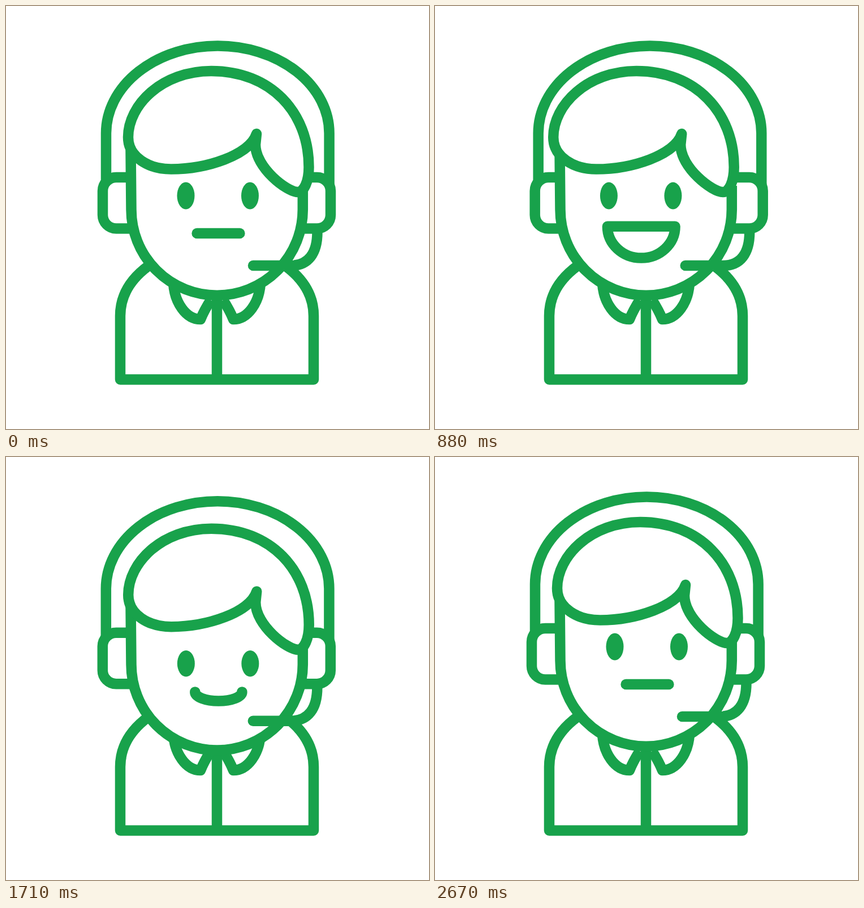
Recreate the animation shown at these times as an HTML page. Size 748x748 px, loop 2710 ms.

```html
<!DOCTYPE html>
<html lang="en">
<head>
<meta charset="utf-8">
<title>Support agent</title>
<style>
  html, body { margin: 0; width: 100%; height: 100%; overflow: hidden; background: #fff; }
  svg { display: block; width: 100%; height: 100%; }
  .line { fill: none; stroke: #18a24b; stroke-width: 18.5; stroke-linejoin: round; }
  .solid { fill: #fff; }
  .round { stroke-linecap: round; }
  ellipse { fill: #18a24b; }
</style>
</head>
<body>
<svg viewBox="0 0 748 748">
  <g class="line">
    <path d="M252 459.5C220 483 202 513 202 548V660.5H544V548C544 513 526 483 494 459.5"/>
    <path d="M373 510V660"/>
    <path id="collar" d="M296 490C298 524 318 554 344 554C348 544 355 531 362 520"/>
    <use href="#collar" transform="matrix(-1 0 0 1 746 0)"/>
  </g>
  <g class="line" data-move="headset">
    <path d="M177 313V225A197.3 154.5 0 0 1 571.6 225V315"/>
    <path d="M225 303H195A24 24 0 0 0 171 327V369.5A24 24 0 0 0 195 393.5H225"/>
    <path d="M520 303H550A24 24 0 0 1 574 327V369.5A24 24 0 0 1 550 393.5H520"/>
  </g>
  <path class="line solid" data-move="face" d="M220.5 255L221.5 360A151.5 151.5 0 0 0 524.8 360V318"/>
  <path class="line solid" data-move="hair" d="M443 226C431 264 354 288.5 292 288.5C252 288.5 216 267 216 232C216 175 276 115 363 115C468 115 535.5 188 535.5 285C535.5 310 527 329 516 329C497 329 441 286 441 245Z"/>
  <g data-move="eyes">
    <ellipse class="eye" cx="318" cy="335.5" rx="15.5" ry="24"/>
    <ellipse class="eye" cx="431.5" cy="335.5" rx="15.5" ry="24"/>
  </g>
  <path id="mouth" class="line round" data-move="mouth"/>
  <path class="line round" data-move="headset" d="M550.5 398C551 438 534 459 504 459H437"/>
</svg>
<script>
const LOOP = 2710;

// Parallax of each part at full sideways look and at full nod.
const reach = {
  headset: [5.7, 11.5],
  face: [0, 10.3],
  hair: [-6.8, 17.5],
  eyes: [-10.6, 44.5],
  mouth: [-10.8, 22]
};

// Keys are [time, value] pairs, eased in and out.
const look = [[0, 0], [625, 1], [865, 1], [1460, -.05], [2090, 0]];
const nod = [[865, 0], [1460, 1], [2110, 0]];
const open = [[290, 0], [540, 1], [830, 1], [1080, 0]];
const smile = [[1210, 0], [1460, 1], [1520, 1], [1830, 0]];
const squint = [[1210, 0], [1460, 1], [1750, 0]];

function valueAt(keys, t) {
  if (t <= keys[0][0]) return keys[0][1];
  for (let i = 1; i < keys.length; i++) {
    const [t0, v0] = keys[i - 1], [t1, v1] = keys[i];
    if (t < t1) {
      const u = (t - t0) / (t1 - t0);
      return v0 + (v1 - v0) * u * u * (3 - 2 * u);
    }
  }
  return keys[keys.length - 1][1];
}

function mouthPath(opened, smiling) {
  const half = 37.9 + 24.6 * opened + 11.1 * smiling;
  const depth = 62.5 * opened + 49 * smiling;
  const y = 402 - 13.7 * opened - 4 * smiling;
  const left = 375.5 - half, right = 375.5 + half;
  if (depth < .1) return `M${left} ${y}H${right}`;
  return `M${left} ${y}A${half} ${depth} 0 0 0 ${right} ${y}${opened > 0 ? 'Z' : ''}`;
}

const parts = document.querySelectorAll('[data-move]');
const eyes = document.querySelectorAll('.eye');
const mouth = document.getElementById('mouth');

function draw(now) {
  const t = now % LOOP;
  const lift = t < 625 ? .035 * Math.sin(Math.PI * t / 625) : 0;
  const x = valueAt(look, t), y = valueAt(nod, t) - lift;
  for (const part of parts) {
    const [dx, dy] = reach[part.dataset.move];
    part.setAttribute('transform', `translate(${dx * x} ${dy * y})`);
  }
  for (const eye of eyes) eye.setAttribute('ry', 24 - 16 * valueAt(squint, t));
  mouth.setAttribute('d', mouthPath(valueAt(open, t), valueAt(smile, t)));
}

const start = performance.now();
function tick() {
  draw(performance.now() - start);
  requestAnimationFrame(tick);
}
tick();
</script>
</body>
</html>
```
